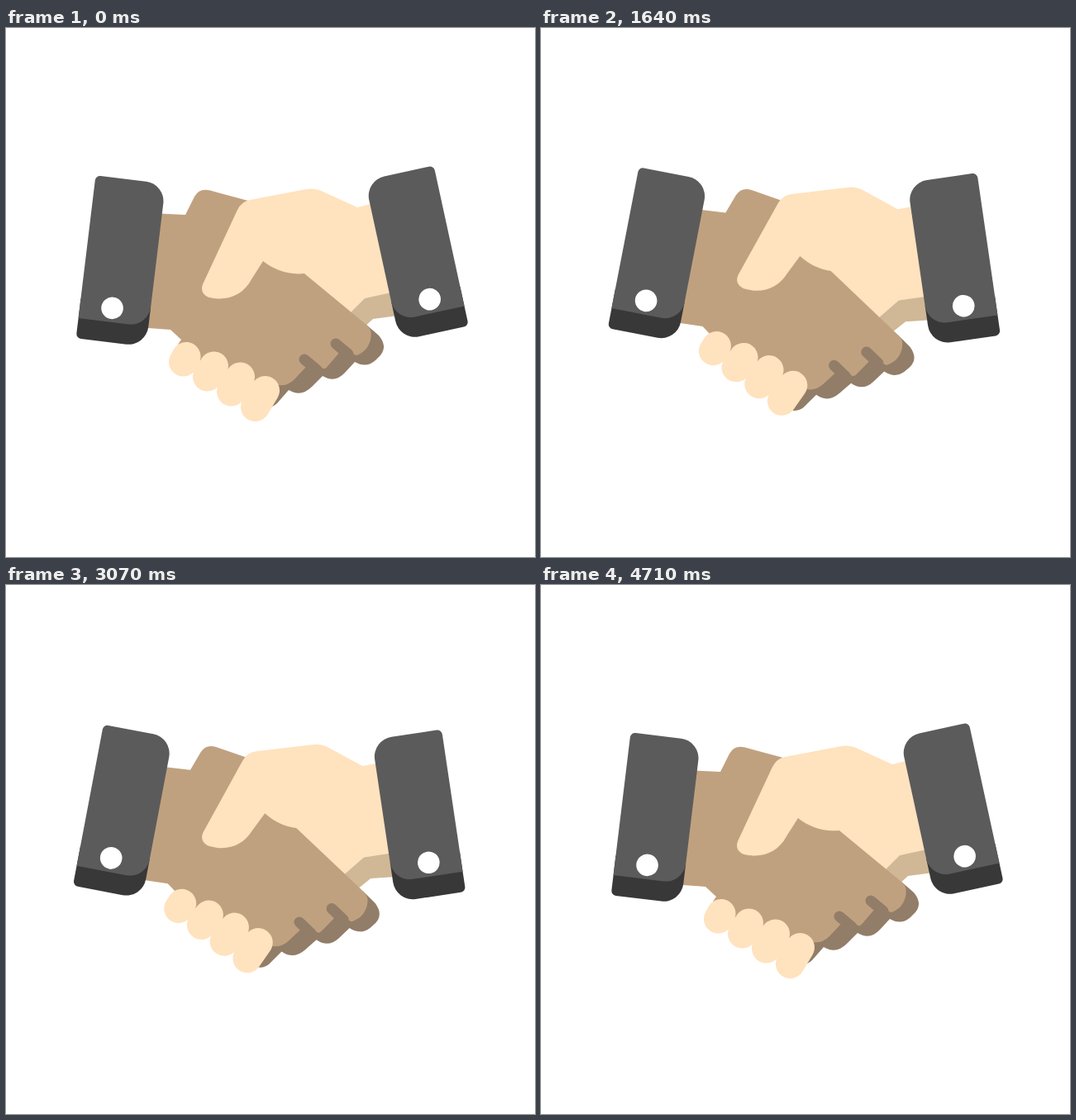
Write an HTML page that moves like this. It is 640 by 640 pixels and loops after 4780 ms.

```html
<!DOCTYPE html>
<html lang="en">
<head>
<meta charset="utf-8">
<title>Handshake</title>
<style>
  html, body { margin: 0; width: 100%; height: 100%; overflow: hidden; background: #fff; }
  svg { display: block; width: 100vw; height: 100vh; }
  .pale { fill: #ffe2be; }
  .pale-shade { fill: #d0b796; }
  .tan { fill: #c0a17f; }
  .tan-shade { fill: #927d68; }
  .slot { stroke: #927d68; stroke-width: 13; stroke-linecap: round; }
  .finger { stroke: #ffe2be; stroke-width: 35; stroke-linecap: round; }
  .cloth { fill: #5b5b5b; }
  .cloth-shade { fill: #383838; }
</style>
</head>
<body>
<svg viewBox="0 0 640 640">
  <defs>
    <g id="sleeve">
      <path class="cloth-shade" d="M0 150H85.3V174.4A24 24 0 0 1 61.3 198.4H6A6 6 0 0 1 0 192.4Z"/>
      <path class="cloth" d="M6 0H61.3A24 24 0 0 1 85.3 24V150A24 24 0 0 1 61.3 174H0V6A6 6 0 0 1 6 0Z"/>
      <circle cx="39.2" cy="157" r="13.3" fill="#fff"/>
    </g>
  </defs>

  <!-- right palm, behind the left hand -->
  <g class="right">
    <path class="pale" d="M371 195L379 196L425 217L441 213L470 206L478 318L434 327L395 366L340 320V220Z"/>
    <path class="pale-shade" d="M434 327L478 317.5V347.5L444 352L418 376L395 366Z"/>
  </g>

  <g class="left">
    <path class="tan-shade" d="M436 359L451 372Q462 385 453 396L447 402Q436 412 422 404L410 417Q398 430 383 421L370 434Q357 447 342 438L328 454Q321 461 310 458L305 430L400 370Z"/>
    <path class="tan" d="M165 223.5L217 226L228 204Q234 193 247 196.500L293 209L310 214L330 271.500L436 359Q441 363 441.500 368C442.500 377 439 385 434 390Q428 395 424 396L405 389L403 393L388 410.500Q385 413.500 382 411L366 404L363 410L349 425Q340 434 328 432L316 431L305 437L294 433L265 417L233 402L222 395L208 383L212 377L199 365L165 362.500Z"/>
    <path class="slot" d="M399 382L414 394.500M361 401L376 413.500"/>
  </g>

  <!-- right thumb and fingertips, in front -->
  <g class="right">
    <path class="pale" d="M238.500 309L280 220Q285 210 295 208L362 195.300Q371 193 379 196.500L400 206L361 297C342 299 325 293 311 282L297 304C287 323 268 331 246 326C238 323 235 317 238.500 309Z"/>
    <path class="finger" d="M218 397.500L214.500 404M251.500 409L243.500 422M283.500 422L272.500 440M313.500 438.500L301.500 458.500"/>
  </g>

  <g class="left"><use href="#sleeve" transform="translate(108.5 178.3) rotate(6.9)"/></g>
  <g class="right"><use href="#sleeve" transform="translate(517.5 166.4) rotate(-12.3) scale(-1 1)"/></g>
</svg>
<script>
  const LOOP = 4780;   // ms
  const STEPS = 67;    // poses per loop
  const SHAKE = 33.2;  // poses per shake
  const SWING = 6;     // degrees

  const arms = [
    { parts: document.querySelectorAll('.left'), pivot: '255 314' },
    { parts: document.querySelectorAll('.right'), pivot: '398 312' }
  ];

  function draw(ms) {
    const step = Math.floor((ms % LOOP) / LOOP * STEPS + 0.1);
    const angle = SWING * (1 - Math.cos(2 * Math.PI * step / SHAKE)) / 2;
    for (const { parts, pivot } of arms) {
      for (const part of parts) part.setAttribute('transform', `rotate(${angle} ${pivot})`);
    }
  }

  const start = performance.now();
  function tick() {
    draw(performance.now() - start);
    requestAnimationFrame(tick);
  }
  tick();
</script>
</body>
</html>
```
